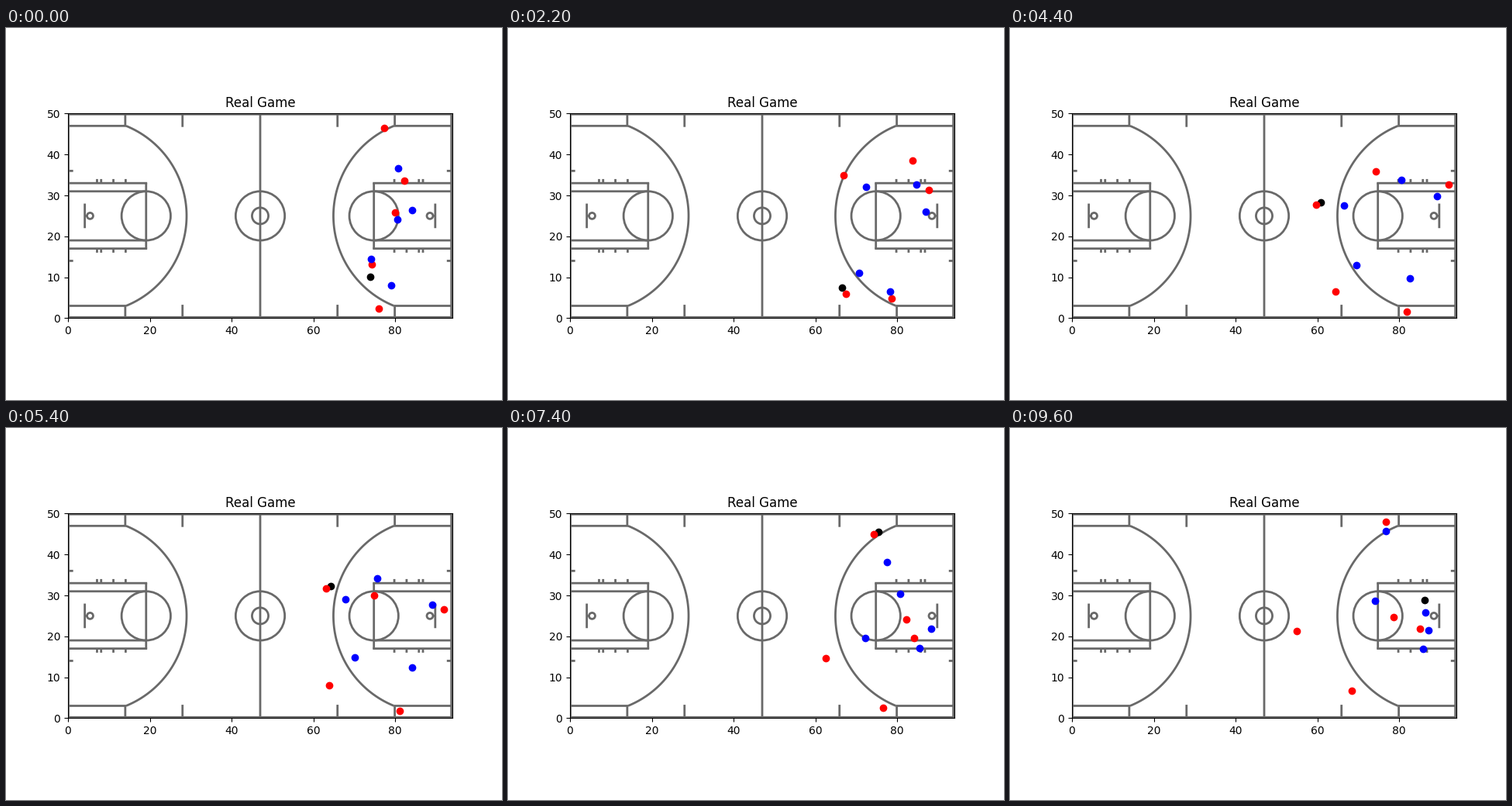
A matplotlib script that plays this animation: 640x480 px, repeating every 9.8 s.

```python
import numpy as np
import matplotlib.pyplot as plt
from matplotlib.animation import FuncAnimation
from matplotlib.patches import Circle, Rectangle

FRAMES, INTERVAL = 49, 200
STYLE = dict(color="#696969", lw=2, snap=False, zorder=1)
SCALE, LEFT, BOTTOM = 496 / 94, 80, 374.3  # pixels per foot, court corner
STEPS = np.arange(FRAMES)

# Players run through a few points; busy ones turn on every beat.
BEATS = {5: (0, 15, 22, 37, 48), 7: (0, 7, 15, 22, 31, 37, 48)}
RED = [
    [(488, 129), (416, 208), (395, 228), (472, 137), (485, 121)],
    [(514, 197), (518, 184), (525, 162), (472, 185), (481, 237), (514, 247), (495, 244)],
    [(502, 238), (532, 224), (552, 198), (566, 202), (562, 261), (524, 271), (529, 259)],
    [(472, 305), (502, 359), (512, 366), (484, 361), (441, 339)],
    [(481, 362), (426, 340), (420, 340), (410, 297), (370, 262)],
]
BLUE = [
    [(506, 181), (464, 197), (461, 213), (431, 229), (450, 215), (506, 214), (536, 238)],
    [(524, 235), (517, 202), (537, 202), (505, 196), (468, 191), (489, 173), (485, 133)],
    [(505, 247), (546, 232), (551, 217), (546, 259), (540, 261)],
    [(471, 298), (449, 319), (447, 306), (461, 271), (471, 223)],
    [(497, 332), (485, 341), (504, 337), (516, 323), (528, 297), (531, 284), (533, 285)],
]


def smooth(t, v):
    """Cubic curve through the points (t, v) without overshoot, at every step."""
    h, d = np.diff(t), np.diff(v) / np.diff(t)
    same = d[:-1] * d[1:] > 0
    total = np.where(same, d[:-1] + d[1:], 1)
    inner = np.where(same, 2 * d[:-1] * d[1:] / total, 0)
    m = np.concatenate([d[:1], inner, d[-1:]])
    i = np.clip(np.searchsorted(t, STEPS, side="right") - 1, 0, len(h) - 1)
    s = (STEPS - t[i]) / h[i]
    return ((1 + 2 * s) * (1 - s) ** 2 * v[i] + s * (1 - s) ** 2 * h[i] * m[i]
            + s ** 2 * (3 - 2 * s) * v[i + 1] + s ** 2 * (s - 1) * h[i] * m[i + 1])


def run(points):
    t = np.array(BEATS[len(points)])
    return np.stack([smooth(t, v) for v in np.array(points, float).T], axis=1)


def move(start, goal, first, last):
    """Travel evenly from one path to another between two steps."""
    k = np.clip((STEPS - first) / (last - first), 0, 1)[:, None]
    return start + k * (goal - start)


def play_ball(red):
    """Hand-off, pass across the court, then a shot at the basket."""
    ball = move(red[3] + (-2, 16), red[4] + (-5, -8), 0, 7)
    ball = move(ball, red[0] + (6, -3), 17, 20)
    return move(ball, np.array([535, 222]), 44, 48)


def line(ax, x, y, cap="butt"):
    ax.plot(x, y, solid_capstyle=cap, **STYLE)


def ring(ax, x, r):
    ax.add_patch(Circle((x, 25), r, fill=False, **STYLE))


def draw_half(ax, fx):
    """Draw one half of the court; fx maps distance from the baseline to x."""
    def seg(x0, y0, x1, y1, cap="butt"):
        line(ax, [fx(x0), fx(x1)], [y0, y1], cap)

    reach = np.arcsin(22 / 23.75)
    a = np.linspace(-reach, reach, 90)
    line(ax, fx(5.25 + 23.75 * np.cos(a)), 25 + 23.75 * np.sin(a))

    for side in (-1, 1):
        def y(d):
            return 25 + side * d
        seg(0, y(22), 14.2, y(22))
        seg(14, y(22), 14, y(25))
        seg(28, y(22), 28, y(25), "projecting")
        seg(0, y(8), 19.1, y(8), "projecting")
        seg(0, y(6), 19.1, y(6))
        seg(0, y(11), 1, y(11), "projecting")
        for x in (7.1, 8.1, 11.1, 14.1):
            seg(x, y(8), x, y(9))
    seg(19.1, 17, 19.1, 33)
    ring(ax, fx(19.1), 6)
    seg(4.1, 22, 4.1, 28)
    seg(4.1, 25, 4.6, 25)
    ring(ax, fx(5.4), 0.75)


fig, ax = plt.subplots(figsize=(6.4, 4.8), dpi=100)
ax.set_xlim(0, 94)
ax.set_ylim(0, 50)
ax.set_aspect("equal")
ax.set_title("Real Game")
ax.set_xticks(range(0, 81, 20))
ax.set_yticks(range(0, 51, 10))

draw_half(ax, lambda x: x)
draw_half(ax, lambda x: 93.9 - x)
line(ax, [47, 47], [0, 50])
ring(ax, 47, 2)
ring(ax, 47, 6)
ax.add_patch(Rectangle((0.1, 0.2), 93.65, 49.65, fill=False, **STYLE))

red, blue = [run(p) for p in RED], [run(p) for p in BLUE]
dots = [(ax.plot([], [], color + "o", zorder=2)[0], np.array(paths))
        for color, paths in (("k", [play_ball(red)]), ("r", red), ("b", blue))]


def update(n):
    for dot, paths in dots:
        x, y = paths[:, n].T
        dot.set_data((x - LEFT) / SCALE, (BOTTOM - y) / SCALE)
    return [dot for dot, _ in dots]


anim = FuncAnimation(fig, update, frames=FRAMES, interval=INTERVAL, repeat=True)
plt.show()
```
